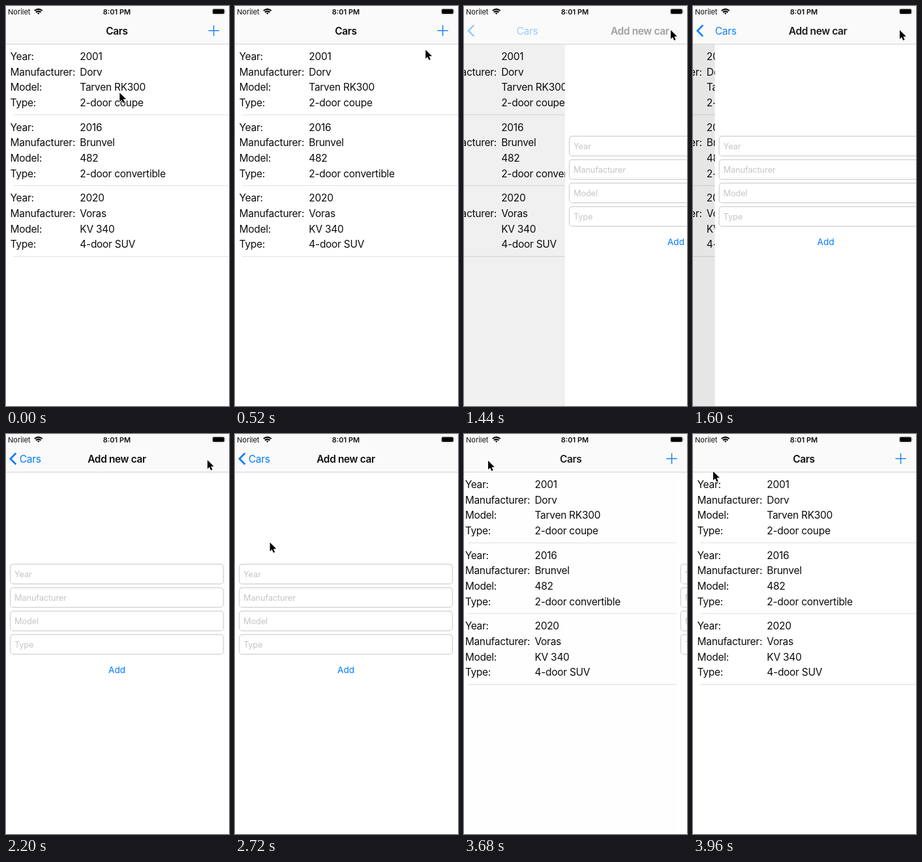
An HTML page for the animation above (4000 ms loop, 342 by 614 pixels).

```html
<!DOCTYPE html>
<html lang="en">
<head>
<meta charset="utf-8">
<title>Cars</title>
<style>
  html, body { margin: 0; width: 100%; height: 100%; overflow: hidden; background: #fff; }
  svg { display: block; width: 100%; height: 100%; }
  text { font-family: Inter, Roboto, sans-serif; font-size: 15.5px; letter-spacing: -.28px; fill: #0c0c0c; }
  .title { font-weight: 600; letter-spacing: -.39px; text-anchor: middle; }
  .status { font-size: 11px; letter-spacing: 0; }
  .hint { font-size: 12.8px; letter-spacing: -.14px; fill: #c5c5c8; }
  .blue { fill: #007aff; }
  .add { font-size: 13.7px; letter-spacing: -.1px; text-anchor: middle; }
</style>
</head>
<body>
<svg viewBox="0 0 342 614">
  <rect width="342" height="614" fill="#fff"/>
  <g id="list"></g>
  <rect id="dim" y="59" width="342" height="555"/>
  <g id="form"><rect y="59" width="342" height="555" fill="#fff"/></g>

  <rect width="342" height="58.5" fill="#fafafa"/>
  <path d="M0 58.5H342" stroke="#d2d2d2"/>
  <text class="status" x="3" y="12.5">Norilet</text>
  <g fill="none" stroke="#000" stroke-width="2.1">
    <path d="M43.7 7.3Q49.7 2.3 55.7 7.3"/>
    <path d="M45.9 9.6Q49.7 6.5 53.5 9.6"/>
    <path d="M47.9 10.9Q49.7 9.6 51.5 10.9L49.7 13Z" fill="#000" stroke="none"/>
  </g>
  <text class="status title" x="170" y="12.5">8:01 PM</text>
  <rect x="316.1" y="3.9" width="19.6" height="9" rx="2.6" fill="#fafafa" stroke="#c4c4c4" stroke-width=".8"/>
  <rect x="317" y="4.8" width="17.8" height="7.2" rx="1.8"/>
  <path d="M336.6 6.8Q338.2 8.4 336.6 10Z" fill="#999"/>

  <text id="listTitle" class="title" y="43.5">Cars</text>
  <text id="formTitle" class="title" y="43.5">Add new car</text>
  <path id="chevron" d="M15.3 29.3L6.8 38L15.3 46.7" fill="none" stroke="#007aff" stroke-width="2.6"/>
  <text id="back" class="blue" y="43.5">Cars</text>
  <path id="plus" d="M310.4 37.8H326.8M318.6 29.6V46" stroke="#1e84ea" stroke-width="1.5"/>
  <path id="cursor" d="M0 0V13.6L3.1 10.7L5.3 15.8L7.6 14.8L5.4 9.8H9.8Z" stroke="#fff" stroke-width="1.1" paint-order="stroke"/>
</svg>
<script>
const LOOP = 4000, W = 342;
const PUSH = { press: 1200, start: 1300, rate: 13 };
const POP = { press: 3280, start: 3360, rate: 15 };

const el = id => document.getElementById(id);
const parts = {};
for (const id of ['list', 'dim', 'form', 'listTitle', 'formTitle', 'chevron', 'back', 'plus', 'cursor'])
  parts[id] = el(id);

function add(parent, tag, attrs, label) {
  const node = document.createElementNS('http://www.w3.org/2000/svg', tag);
  for (const key in attrs) node.setAttribute(key, attrs[key]);
  if (label) node.textContent = label;
  parent.append(node);
}

const labels = ['Year', 'Manufacturer', 'Model', 'Type'];
const cars = [
  ['2001', 'Dorv', 'Tarven RK300', '2-door coupe'],
  ['2016', 'Brunvel', '482', '2-door convertible'],
  ['2020', 'Voras', 'KV 340', '4-door SUV']
];

cars.forEach((car, i) => {
  const top = i * 108.7;
  car.forEach((value, j) => {
    const y = 83 + top + j * 23.65;
    add(parts.list, 'text', { x: 6.5, y }, labels[j] + ':');
    add(parts.list, 'text', { x: 113.3, y }, value);
  });
  add(parts.list, 'path', { d: `M11.5 ${167 + top}H${W}`, stroke: '#dedede' });
});

labels.forEach((label, i) => {
  const y = 199.8 + i * 36;
  add(parts.form, 'rect', { x: 6.5, y, width: 327, height: 30.4, rx: 4.5, fill: '#fff', stroke: '#d0d0d0', 'stroke-width': 1.2 });
  add(parts.form, 'text', { x: 13, y: y + 19.8, class: 'hint' }, label);
});
add(parts.form, 'text', { x: 170, y: 367.3, class: 'blue add' }, 'Add');

// Pointer path: time, x, y
const path = [
  [0, 174.3, 133.3], [160, 141, 180], [260, 134, 209], [400, 215, 140], [560, 309, 50],
  [720, 314, 31], [920, 317, 37], [1720, 317, 37], [2200, 309, 40], [2280, 301, 42],
  [2400, 265, 160], [2540, 165, 348], [2700, 62, 190], [2840, 33, 42], [3120, 37, 41],
  [3780, 37, 41], [3960, 31, 57.5]
];

// Slope at a key, flat at ends and turning points
function slope(i, axis) {
  const a = path[i - 1], b = path[i], c = path[i + 1];
  if (!a || !c || (b[axis] - a[axis]) * (c[axis] - b[axis]) <= 0) return 0;
  return (c[axis] - a[axis]) / (c[0] - a[0]);
}

function pointer(t, axis) {
  const last = path.length - 1;
  if (t >= path[last][0]) return path[last][axis];
  const i = path.findIndex(key => key[0] > t) - 1;
  const a = path[i], b = path[i + 1], span = b[0] - a[0];
  const u = (t - a[0]) / span, v = 1 - u;
  return v * v * (1 + 2 * u) * a[axis] + u * u * (3 - 2 * u) * b[axis]
    + span * u * v * (v * slope(i, axis) - u * slope(i + 1, axis));
}

const clamp = v => Math.max(0, Math.min(1, v));

// Critically damped spring from 0 to 1
function spring(t, { start, rate }) {
  const a = rate * Math.max(0, t - start) / 1000;
  const rest = (1 + a) * Math.exp(-a);
  return rest < .003 ? 1 : 1 - rest;
}

const pressed = (t, { press }) => 1 - .8 * clamp((t - press + 20) / 80);

const move = (node, x, y = 0) => node.setAttribute('transform', `translate(${x.toFixed(2)} ${y.toFixed(2)})`);
const fade = (node, alpha) => node.setAttribute('opacity', clamp(alpha).toFixed(3));

function render(t) {
  const popping = t >= POP.press;
  const p = popping ? 1 - spring(t, POP) : spring(t, PUSH);
  const q = 1 - p;

  move(parts.list, -.3 * W * p);
  move(parts.form, W * q);
  fade(parts.dim, p < 1 ? .11 * p : 0);

  move(parts.listTitle, 170 - 132 * p);
  fade(parts.listTitle, popping ? 1 - 1.6 * p : 1 - 2 * p);
  move(parts.formTitle, 170 + 220 * q);
  fade(parts.formTitle, popping ? 1 - 1.6 * q : 1.6 * p - .5);

  const backAlpha = popping ? pressed(t, POP) * p : 1.6 * p - .5;
  move(parts.back, 20.7 + 132 * q);
  fade(parts.back, backAlpha);
  fade(parts.chevron, backAlpha);
  fade(parts.plus, popping ? 1.6 * q - .5 : pressed(t, PUSH) * (1 - 1.4 * p));

  move(parts.cursor, pointer(t, 1), pointer(t, 2));
}

const begin = performance.now();
function tick() {
  render((performance.now() - begin) % LOOP);
  requestAnimationFrame(tick);
}
tick();
</script>
</body>
</html>
```
